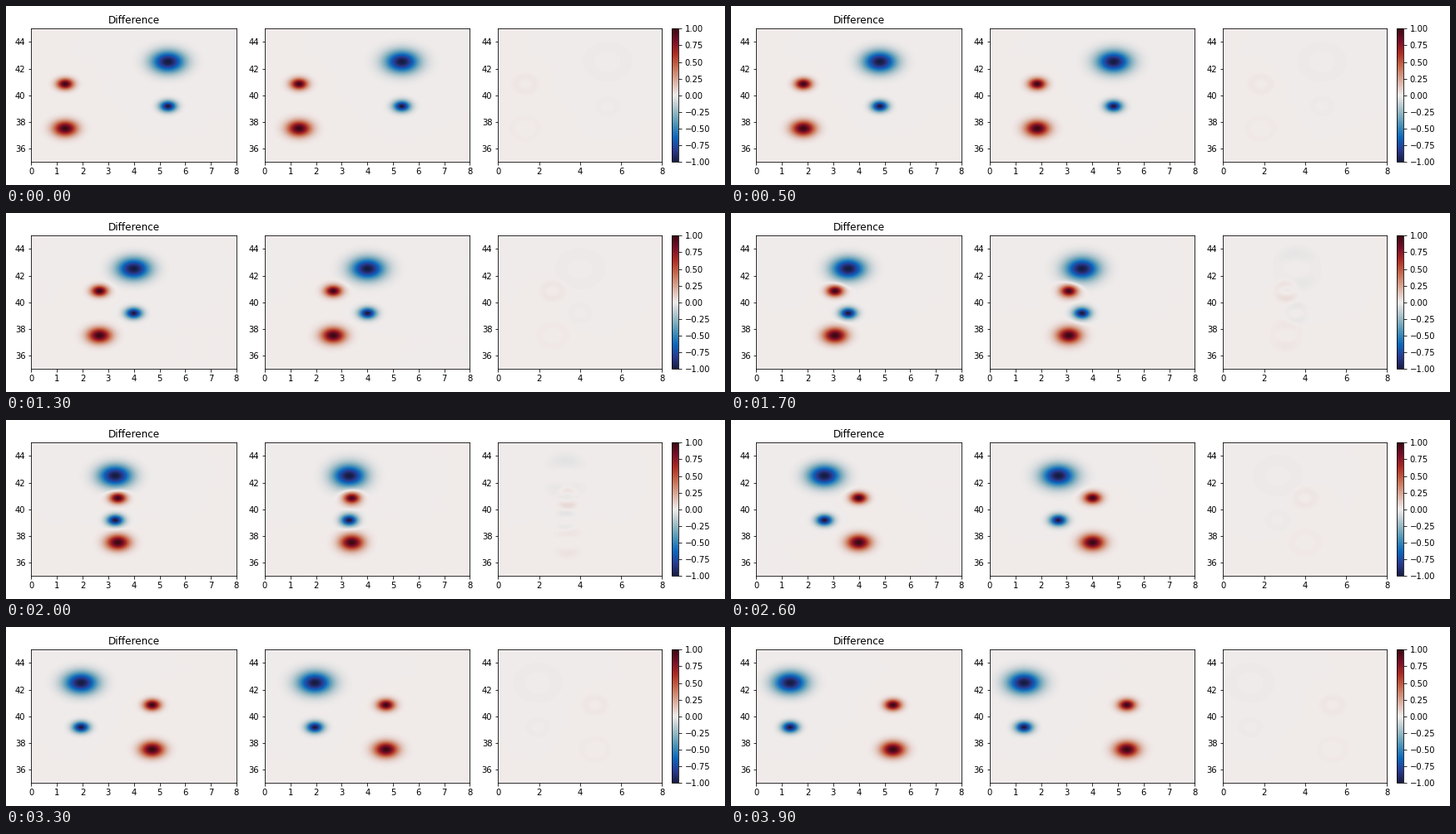
These frames come from a looping animation (864x216 px, 4 s). A matplotlib script:

```python
import numpy as np
import matplotlib.pyplot as plt
from matplotlib.animation import FuncAnimation
from matplotlib.colors import LinearSegmentedColormap

W, H, DPI = 864, 216, 72
FRAMES, INTERVAL = 40, 100
EXTENT = (0, 8, 35, 45)

# Diverging blue - off-white - red map
STOPS = [(23, 28, 66), (41, 58, 143), (11, 102, 189), (69, 144, 185),
         (142, 181, 194), (210, 216, 219), (230, 210, 204), (213, 157, 137),
         (196, 101, 72), (172, 43, 36), (120, 14, 40), (60, 9, 17)]
nodes = [(k / 11, tuple(c / 255 for c in rgb)) for k, rgb in enumerate(STOPS)]
nodes.insert(6, (0.5, (241 / 255, 236 / 255, 235 / 255)))
balance = LinearSegmentedColormap.from_list("balance", nodes, N=256)

# Eddies in unit-square coordinates: sign, height, width, residual strength
EDDIES = [(1, 3 / 12, 0.040, 0.8),
          (-1, 5 / 12, 0.028, 1.0),
          (1, 7 / 12, 0.028, 1.8),
          (-1, 9 / 12, 0.056, 1.0)]

u = (np.arange(320) + 0.5) / 320
X, Y = np.meshgrid(u, u)


def fields(i):
    """Return the summed eddies and the small residual around them."""
    s = i / (FRAMES - 1)
    near = np.exp(-((s - 0.5) / 0.1) ** 2)
    total = np.zeros_like(X)
    resid = np.zeros_like(X)
    for sign, cy, width, strength in EDDIES:
        cx = 1 / 6 + s / 2 if sign > 0 else 2 / 3 - s / 2
        dx, dy = X - cx, Y - cy
        r2 = (dx ** 2 + dy ** 2) / width ** 2
        total += sign * np.exp(-r2 / 2)
        ring = (r2 / 4 * np.exp(1 - r2 / 4)) ** 2
        sin2 = dy ** 2 / (dx ** 2 + dy ** 2 + 1e-9)
        amp = strength * (0.012 + 0.03 * near)
        resid += sign * amp * ring * (1 - near + near * sin2)
    return total, resid


fig = plt.figure(figsize=(W / DPI, H / DPI), dpi=DPI)


def add_axes(left, width):
    return fig.add_axes([left / W, 27.7 / H, width / W, 161 / H])


def panel(left, width, step):
    ax = add_axes(left, width)
    im = ax.imshow(np.zeros_like(X), cmap=balance, vmin=-1, vmax=1,
                   extent=EXTENT, origin="lower", aspect="auto",
                   interpolation="bilinear")
    ax.set_xticks(range(0, 9, step))
    ax.set_yticks(range(36, 45, 2))
    return ax, im


ax_sum, im_sum = panel(30.4, 246.6, 1)
ax_fit, im_fit = panel(310.9, 246.6, 1)
ax_diff, im_diff = panel(591.3, 197.1, 2)
ax_sum.set_title("Difference")

bar = fig.colorbar(im_diff, cax=add_axes(800.4, 8.05))
bar.set_ticks(np.linspace(-1, 1, 9))


def update(i):
    total, resid = fields(i)
    im_sum.set_data(total)
    im_fit.set_data(total + resid)
    im_diff.set_data(resid)
    return im_sum, im_fit, im_diff


anim = FuncAnimation(fig, update, frames=FRAMES, interval=INTERVAL,
                     repeat=True, repeat_delay=0, blit=False)
plt.show()
```
